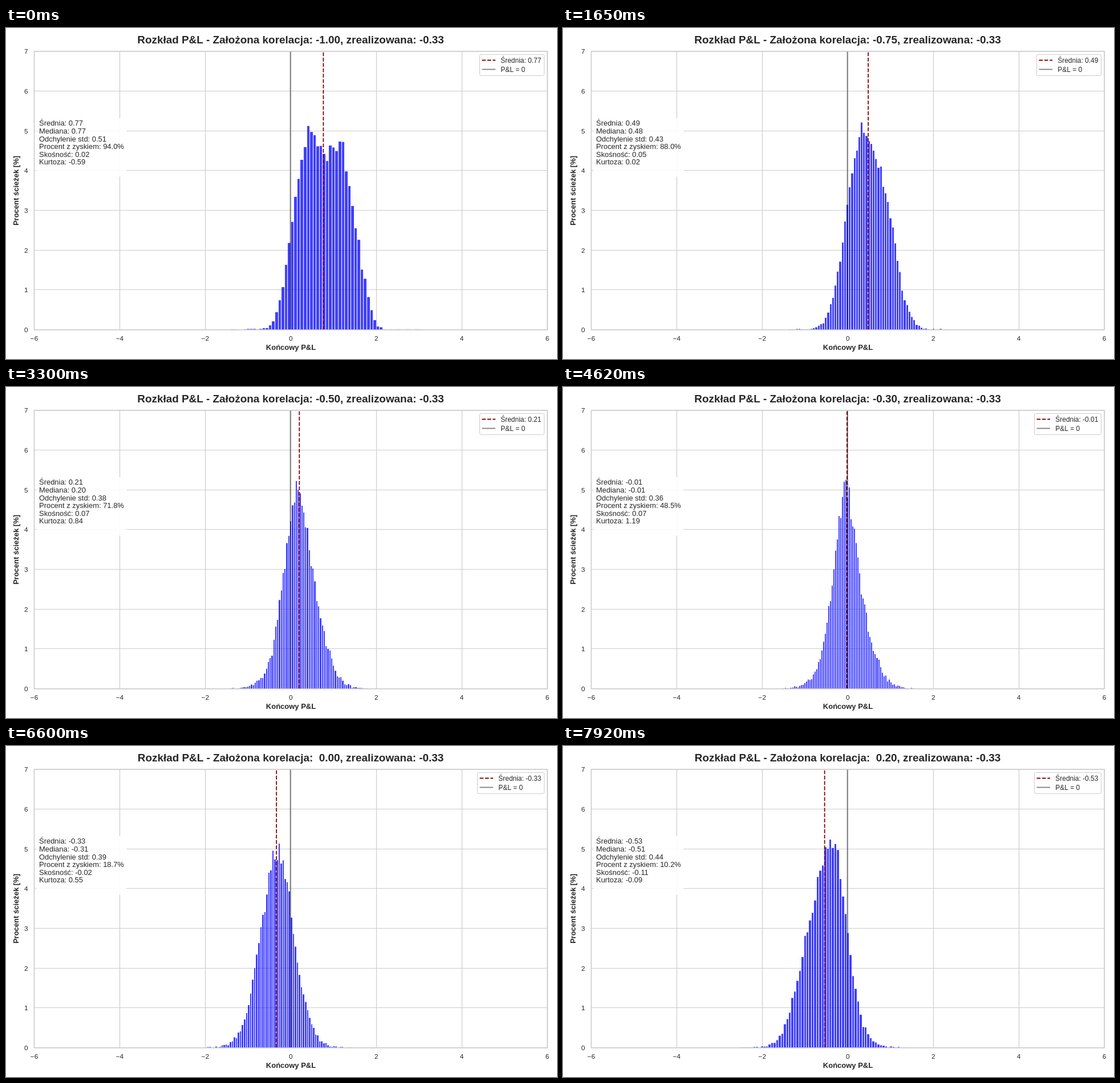
These frames come from a looping animation (966 by 580 pixels, 8 s). An HTML page with a canvas:

```html
<!DOCTYPE html>
<html lang="pl">
<head>
<meta charset="utf-8">
<title>Rozkład P&amp;L</title>
<style>
  html, body { margin: 0; width: 100%; height: 100%; overflow: hidden; background: #fff; }
  canvas { display: block; }
</style>
</head>
<body>
<canvas id="chart" width="966" height="580"></canvas>
<script>
const ctx = document.getElementById('chart').getContext('2d');
const FAMILY = '"Liberation Sans", Arial, sans-serif';
const INK = '#262626', GRID = '#ccc', MEAN = '#8b0000', ZERO = 'rgba(0,0,0,.5)';
const DASH = [6.6, 2.8];
const STEP_MS = 330, LOOP_MS = 8000;
const LEFT = 49.5, RIGHT = 949, TOP = 40.7, BOTTOM = 528.65;
const UNIT = (RIGHT - LEFT) / 12;
const px = x => LEFT + (x + 6) * UNIT;
const py = y => BOTTOM - y * (BOTTOM - TOP) / 7;
const snap = v => Math.floor(v) + .5;

// Statistics as smooth functions of the assumed correlation
function statsFor(rho) {
  const mean = -.326 - 1.045 * rho + .052 * rho ** 2;
  const median = -.312 - .988 * rho + .09 * rho ** 2;
  const std = Math.sqrt(.1305 + .262 * (rho + .3) ** 2);
  const skew = .0785 - .18 * rho - .31 * Math.hypot(rho + .25, .18);
  const bend = (rho + .295) ** 2;
  const kurt = 1.19 - bend / (.105 + .35 * bend);
  const ratio = mean / std;
  const profit = 100 / (1 + Math.exp(.025 - 1.7 * ratio - .06 * ratio ** 3));
  return { rho, mean, median, std, skew, kurt, profit };
}

// Bar height in percent at z standard deviations from the mean:
// a generalised bell that is flat-topped far from the sharpest point
function bell({ rho, skew }, z) {
  const u = rho + .3;
  const power = 1.6 + 3.675 * u ** 2 - 1.75 * u ** 3;
  const width = 2.08 - 1.36 / power;
  const tilt = 1 - 1.5 * skew * Math.sin(2 * z);
  const dip = 1 - .07 * rho ** 8 * Math.cos(4 * z);
  const core = (5 - .8 * u ** 2) * Math.exp(-(Math.abs(z / width) ** power));
  return core * tilt * dip + .05 * Math.exp(-z * z / 8);
}

// Repeatable noise from -1 to 1
function noise(a, b) {
  const s = Math.sin(a * 127.1 + b * 311.7) * 43758.5453;
  return 2 * (s - Math.floor(s)) - 1;
}

function line(x1, y1, x2, y2, color, width, dash = []) {
  ctx.strokeStyle = color;
  ctx.lineWidth = width;
  ctx.setLineDash(dash);
  ctx.beginPath();
  ctx.moveTo(x1, y1);
  ctx.lineTo(x2, y2);
  ctx.stroke();
  ctx.setLineDash([]);
}

function text(str, x, y, size, align = 'left', weight = 'normal') {
  ctx.font = `${weight} ${size}px ${FAMILY}`;
  ctx.textAlign = align;
  ctx.fillStyle = INK;
  ctx.fillText(str, x, y);
}

function drawAxes() {
  for (let x = -6; x <= 6; x += 2) {
    line(snap(px(x)), TOP, snap(px(x)), BOTTOM, GRID, 1.2);
    text(String(x).replace('-', '−'), px(x), 547.5, 11.8, 'center');
  }
  for (let y = 0; y <= 7; y++) {
    line(LEFT, snap(py(y)), RIGHT, snap(py(y)), GRID, 1.2);
    text(y, 38.5, py(y) + 4.4, 11.8, 'right');
  }
  text('Końcowy P&L', 499.5, 563.5, 13, 'center', 'bold');
  ctx.save();
  ctx.translate(22, 285);
  ctx.rotate(-Math.PI / 2);
  text('Procent ścieżek [%]', 0, 0, 13, 'center', 'bold');
  ctx.restore();
}

function drawBars(stats) {
  const sd = stats.std * UNIT, u2 = (stats.rho + .3) ** 2;
  const pitch = 3.02 + 6.3 * u2 / (1 + .45 * u2);
  const reach = Math.ceil(4.3 * sd / pitch);
  ctx.fillStyle = 'rgba(0,0,255,.75)';
  for (let k = -reach; k <= reach; k++) {
    const x = px(stats.mean) + k * pitch;
    const smooth = bell(stats, k * pitch / sd);
    const rough = .12 * Math.sqrt(smooth) * noise(stats.rho, k);
    const height = Math.round(100 * (smooth + rough)) / 100;
    if (height <= 0) continue;
    const l = Math.round(x - pitch / 2) + 1, r = Math.round(x + pitch / 2), y = py(height);
    ctx.fillRect(l, y, r - l, BOTTOM - y);
  }
}

function drawMarkers(mean) {
  const at = value => px(value) - .65;
  line(at(mean), BOTTOM, at(mean), TOP, MEAN, 1.8, DASH);
  line(at(0), BOTTOM, at(0), TOP, ZERO, 1.8);
  ctx.strokeStyle = GRID;
  ctx.lineWidth = 1.5;
  ctx.strokeRect(LEFT, TOP + .3, RIGHT - LEFT, BOTTOM - TOP);
}

function drawStats(s) {
  ctx.fillStyle = 'rgba(255,255,255,.9)';
  ctx.fillRect(53.5, 158, 158, 102.5);
  [
    `Średnia: ${s.mean.toFixed(2)}`,
    `Mediana: ${s.median.toFixed(2)}`,
    `Odchylenie std: ${s.std.toFixed(2)}`,
    `Procent z zyskiem: ${s.profit.toFixed(1)}%`,
    `Skośność: ${s.skew.toFixed(2)}`,
    `Kurtoza: ${s.kurt.toFixed(2)}`
  ].forEach((row, i) => text(row, 58, 171.3 + 13.6 * i, 12.95));
}

function drawLegend(mean) {
  const size = 11.95, label = `Średnia: ${mean.toFixed(2)}`;
  ctx.font = `${size}px ${FAMILY}`;
  const x = 938.3 - ctx.measureText(label).width;
  const left = Math.round(x - 37.5) + .5;
  ctx.beginPath();
  ctx.roundRect(left, 46.5, 943.5 - left, 37, 2.4);
  ctx.fillStyle = 'rgba(255,255,255,.8)';
  ctx.fill();
  ctx.strokeStyle = GRID;
  ctx.lineWidth = 1;
  ctx.stroke();
  line(x - 32.8, 56.5, x - 9.2, 56.5, MEAN, 1.8, DASH);
  line(x - 32.8, 72.5, x - 9.2, 72.5, ZERO, 1.8);
  text(label, x, 60.5, size);
  text('P&L = 0', x, 76.5, size);
}

function draw(step) {
  const stats = statsFor((step - 20) / 20);
  ctx.fillStyle = '#fff';
  ctx.fillRect(0, 0, 966, 580);
  drawAxes();
  drawBars(stats);
  drawMarkers(stats.mean);
  drawStats(stats);
  drawLegend(stats.mean);
  const rho = stats.rho.toFixed(2).padStart(5);
  text(`Rozkład P&L - Założona korelacja: ${rho}, zrealizowana: -0.33`, 499, 27, 18.9, 'center', 'bold');
}

let shown = -1;
function tick() {
  const step = Math.floor(performance.now() % LOOP_MS / STEP_MS);
  if (step !== shown) draw(shown = step);
  requestAnimationFrame(tick);
}
tick();
</script>
</body>
</html>
```
